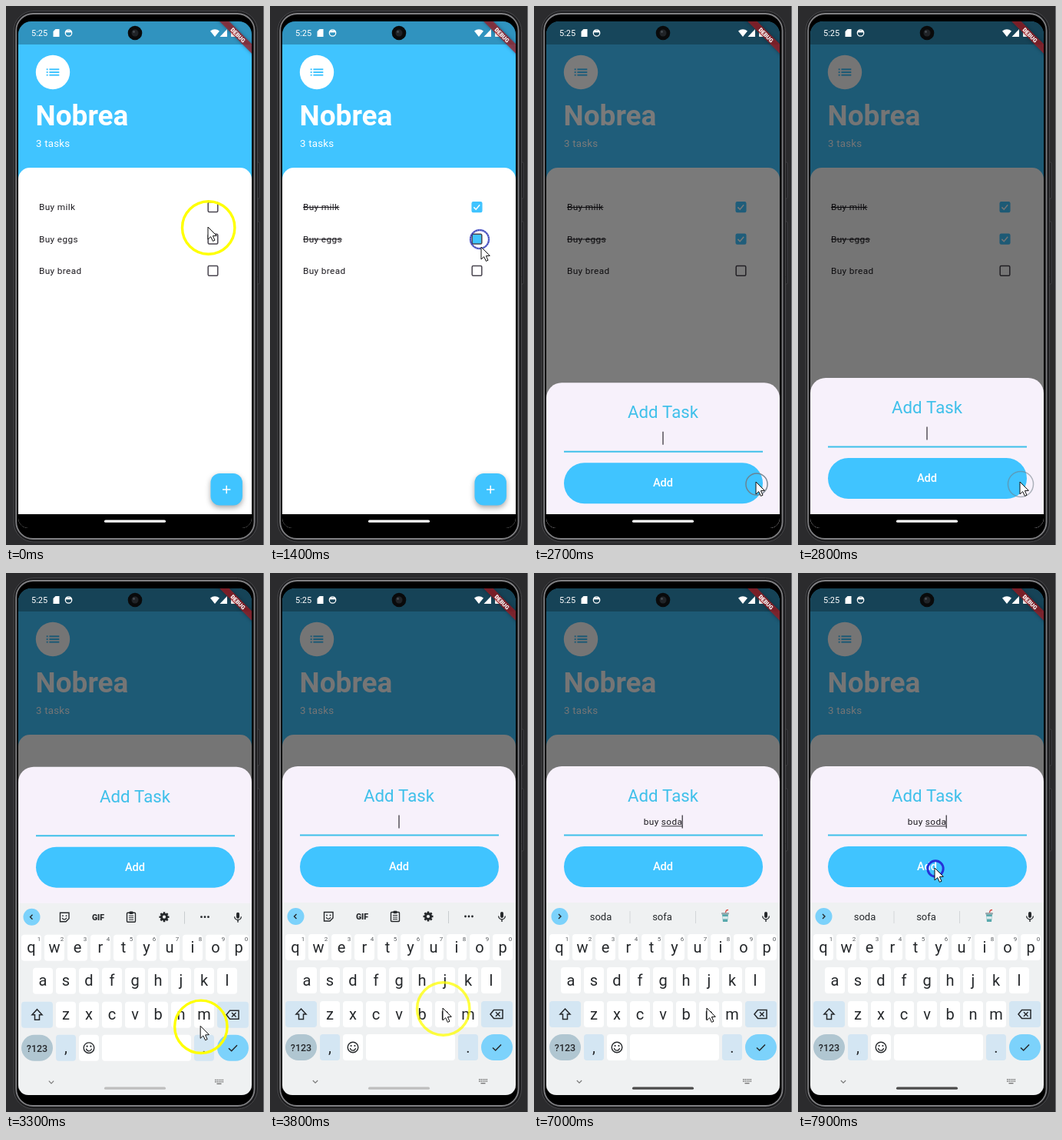
Write an HTML page with a canvas that moves like this. It is 336x700 px and loops after 8 s.

```html
<!DOCTYPE html>
<html lang="en">
<head>
<meta charset="utf-8">
<title>To-do app</title>
<style>
  html, body { margin: 0; width: 100%; height: 100%; overflow: hidden; background: #2b2b2d; }
  canvas { display: block; width: 336px; height: 700px; }
</style>
</head>
<body>
<canvas id="stage" width="336" height="700"></canvas>
<script>
const ctx = document.getElementById('stage').getContext('2d');
const LOOP = 8000;
const BLUE = '#40c4ff';
const TEAL = '#3fc0ea';
const INK = '#1d1b20';
const KEY_INK = '#25282b';

const clamp = v => Math.max(0, Math.min(1, v));
const ramp = (t, from, to) => clamp((t - from) / (to - from));
const easeOut = p => 1 - (1 - p) ** 3;
const easeInOut = p => p * p * (3 - 2 * p);

// Pointer stops: time, x, y
const path = [
  [0, 263, 287], [150, 263, 287], [550, 272, 263], [880, 272, 262], [1000, 273, 303],
  [1280, 273, 303], [1400, 275, 313], [1520, 275, 314], [2050, 283, 604],
  [2150, 283, 604], [2400, 289, 618], [2950, 289, 618], [3600, 225, 565],
  [7230, 225, 565], [7700, 178, 383], [LOOP, 178, 383]
];
const clicks = [[650, 272, 262], [1250, 273, 303], [2500, 290, 621], [7820, 179, 384]];
const CLICK_LENGTH = 400;

const tasks = [['Buy milk', 261, 720], ['Buy eggs', 302.5, 1260], ['Buy bread', 343.8, Infinity]];

// Typed text: time, content
const typed = [
  [2600, ''], [4100, 'b'], [4300, 'bu'], [4600, 'buy'], [5500, 'buy '],
  [6000, 'buy s'], [6250, 'buy so'], [6550, 'buy sod'], [6850, 'buy soda']
];
const hints = [
  [4150, ['but', 'be', 'by']], [4350, ['but', 'buy', 'bus']], [4650, ['buy', 'but', 'by']],
  [5750, ['me', 'a', 'it']], [6050, ['some', 'so', 'stuff']], [6300, ['some', 'so', 'something']],
  [6600, ['soda', 'sod', 'side']], [6900, ['soda', 'sofa', 'cup']]
];
const latest = (list, t) => list.filter(item => item[0] <= t).pop();

function box(x, y, w, h, r, fill) {
  ctx.beginPath();
  ctx.roundRect(x, y, w, h, r);
  if (fill) { ctx.fillStyle = fill; ctx.fill(); }
}
function disc(x, y, r, fill) {
  ctx.beginPath();
  ctx.arc(x, y, r, 0, Math.PI * 2);
  if (fill) { ctx.fillStyle = fill; ctx.fill(); }
}
function stroke(color, width) {
  ctx.strokeStyle = color;
  ctx.lineWidth = width;
  ctx.stroke();
}
function trace(points, closed) {
  ctx.beginPath();
  points.forEach(([x, y]) => ctx.lineTo(x, y));
  if (closed) ctx.closePath();
}
function line(points, color, width) {
  trace(points);
  stroke(color, width);
}
function shape(points, fill) {
  trace(points, true);
  ctx.fillStyle = fill;
  ctx.fill();
}
function label(str, x, y, size, color, { weight = 400, align = 'left', spacing = 0 } = {}) {
  ctx.font = `${weight} ${size}px Roboto, sans-serif`;
  ctx.letterSpacing = spacing + 'px';
  ctx.textAlign = align;
  ctx.fillStyle = color;
  ctx.fillText(str, x, y);
  return ctx.measureText(str).width;
}
const centered = { align: 'center' };

function drawPhone() {
  ctx.fillStyle = '#2b2b2d';
  ctx.fillRect(0, 0, 336, 700);
  ctx.fillStyle = '#77777a';
  ctx.fillRect(335, 0, 1, 700);
  box(325, 203, 5, 47, 1.5, '#1d1d1f'); stroke('#4b4b4e', 0.8);
  box(325, 280, 5, 81, 1.5, '#1d1d1f'); stroke('#4b4b4e', 0.8);
  box(10, 6.5, 317.5, 689.5, 26, '#1c1c1e'); stroke('#48484b', 1);
  box(13.2, 10, 310.3, 682, 22, '#000'); stroke('#808083', 1.8);
}

function drawCheckbox(y, age) {
  const filled = age >= 0;
  box(263.2, y - 6.2, 12.6, 12.6, 1.5, filled ? BLUE : null);
  stroke(filled && age > 180 ? BLUE : '#49454f', 1.5);
  const p = ramp(age, 160, 260);
  if (p > 0) {
    const tip = [268.2 + 5 * p, y + 3.2 - 6 * p];
    line([[265.4, y + 0.4], [268.2, y + 3.2], tip], '#fff', 1.5);
  }
}

function drawList(t) {
  ctx.fillStyle = BLUE;
  ctx.fillRect(16, 18, 304, 240);
  ctx.fillStyle = 'rgba(0,0,0,.25)';
  ctx.fillRect(16, 18, 304, 32);
  disc(61, 86, 22.2, '#fff');
  ctx.fillStyle = BLUE;
  for (const y of [81.3, 85, 88.7]) {
    ctx.fillRect(52.7, y, 1.9, 2);
    ctx.fillRect(56.4, y, 12.9, 2);
  }
  label('Nobrea', 38.5, 155, 37, '#fff', { weight: 700 });
  label('3 tasks', 39, 183, 13.3, '#fff', { spacing: 0.2 });
  box(16, 210, 304, 470, [15, 15, 0, 0], '#fff');

  for (const [name, y, doneAt] of tasks) {
    const width = label(name, 43, y + 4.2, 11.8, INK, { spacing: 0.37 });
    if (t >= doneAt) line([[43, y + 0.5], [43 + width, y + 0.5]], INK, 1);
    drawCheckbox(y, t - doneAt);
  }

  ctx.save();
  ctx.shadowColor = 'rgba(0,0,0,.35)';
  ctx.shadowBlur = 7;
  ctx.shadowOffsetY = 3;
  box(266.5, 607, 41.4, 41.4, 12, BLUE);
  ctx.restore();
  line([[282, 628], [292.4, 628]], '#fff', 1.5);
  line([[287.2, 622.8], [287.2, 633.2]], '#fff', 1.5);
}

function drawSheet(t, top) {
  box(16, top, 304, 200, [20, 20, 0, 0], '#f7f1fb');
  label('Add Task', 168, top + 46, 22.2, TEAL, centered);
  const [editedAt, text] = latest(typed, t) || typed[0];
  const y = top + 75.8;
  ctx.font = '400 11.8px Roboto, sans-serif';
  ctx.letterSpacing = '0.37px';
  const width = ctx.measureText(text).width;
  const start = 168 - width / 2;
  label(text, start, y, 11.8, INK, { spacing: 0.37 });
  const composing = text.slice(text.lastIndexOf(' ') + 1);
  const end = start + width;
  if (composing) {
    const w = ctx.measureText(composing).width;
    line([[end - w, y + 2], [end, y + 2]], INK, 0.9);
  }
  if (Math.floor((t - editedAt) / 500) % 2 === 0) {
    line([[end, top + 63.5], [end, top + 80.5]], '#4a474e', 1.4);
  }
  line([[39, top + 89.5], [298, top + 89.5]], TEAL, 2);
  box(39, top + 104, 259, 53, 26.5, BLUE);
  label('Add', 168, top + 135, 14.6, '#fff', { weight: 500, align: 'center' });
}

function drawMic(x, y) {
  box(x - 2, y - 6, 4, 8, 2, KEY_INK);
  ctx.beginPath();
  ctx.arc(x, y - 0.5, 4.3, 0, Math.PI);
  stroke(KEY_INK, 1.3);
  line([[x, y + 4], [x, y + 7]], KEY_INK, 1.4);
}

function drawTools() {
  line([[34.5, 443], [31.5, 446], [34.5, 449]], KEY_INK, 1.4);
  trace([[70.5, 440.5], [82, 440.5], [82, 448], [78, 452], [70.5, 452]], true);
  stroke(KEY_INK, 1.4);
  disc(74, 444.5, 0.9, KEY_INK);
  disc(78.5, 444.5, 0.9, KEY_INK);
  ctx.beginPath();
  ctx.arc(76, 446.5, 2.8, 0.2, 2.9);
  stroke(KEY_INK, 1.2);
  label('GIF', 120, 450, 10.5, KEY_INK, { weight: 900, align: 'center' });
  box(157.5, 440.5, 11, 12, 1, null); stroke(KEY_INK, 1.4);
  box(160.5, 438.8, 5, 3.5, 1, KEY_INK);
  for (const y of [444.5, 447, 449.5]) line([[160, y], [166, y]], KEY_INK, 1);
  for (let i = 0; i < 8; i++) {
    const a = i * Math.PI / 4;
    line([[206, 446], [206 + 6.5 * Math.cos(a), 446 + 6.5 * Math.sin(a)]], KEY_INK, 2.6);
  }
  disc(206, 446, 5, KEY_INK);
  disc(206, 446, 2.1, '#eff1f2');
  line([[232.5, 439], [232.5, 455]], '#c8cccf', 1);
  for (const x of [254.5, 259, 263.5]) disc(x, 446, 1.4, KEY_INK);
}

function drawCup(x, y) {
  line([[x, y - 4], [x + 1.5, y - 8], [x + 4, y - 8.5]], '#d9473f', 1.3);
  shape([[x - 4, y - 3], [x + 4, y - 3], [x + 3, y + 7], [x - 3, y + 7]], '#58a9ad');
  shape([[x - 3.6, y], [x + 3.6, y], [x + 3.2, y + 3.5], [x - 3.2, y + 3.5]], '#d8e8ea');
  box(x - 5, y - 5, 10, 2.4, 1, '#9aa9ae');
}

function drawHints(words) {
  line([[32, 443], [35, 446], [32, 449]], KEY_INK, 1.4);
  [87, 167, 248].forEach((x, i) => {
    if (words[i] === 'cup') drawCup(x + 1, 446);
    else label(words[i], x, 451, 13, KEY_INK, centered);
  });
  for (const x of [125, 210.5]) line([[x, 439], [x, 455]], '#d3d6d9', 1);
}

function drawKey(x, y, char, fill = '#fff') {
  box(x - 13, y - 17, 26, 34, 4, fill);
  label(char, x, y + 6.5, 20, KEY_INK, centered);
}

function drawKeyboard(t) {
  const tint = '#d4e6f3';
  ctx.fillStyle = '#eff1f2';
  ctx.fillRect(16, 428, 304, 252);
  disc(33.5, 446, 11, '#7cd2fb');
  const words = latest(hints, t);
  if (words) drawHints(words[1]); else drawTools();
  drawMic(302, 446);

  [...'qwertyuiop'].forEach((c, i) => {
    drawKey(33 + 30 * i, 486, c);
    label((i + 1) % 10, 43 + 30 * i, 477.5, 8, '#55595d', centered);
  });
  [...'asdfghjkl'].forEach((c, i) => drawKey(48 + 30 * i, 529, c));
  [...'zxcvbnm'].forEach((c, i) => drawKey(78 + 30 * i, 573, c));

  box(20, 556, 41, 34, 4, tint);
  trace([[40.5, 566], [47, 573], [43.5, 573], [43.5, 579.5], [37.5, 579.5], [37.5, 573], [34, 573]], true);
  stroke(KEY_INK, 1.5);
  box(275, 556, 41, 34, 4, tint);
  trace([[287, 573], [291.5, 567.5], [303, 567.5], [303, 578.5], [291.5, 578.5]], true);
  stroke(KEY_INK, 1.5);
  line([[294, 570.2], [299.6, 575.8]], KEY_INK, 1.4);
  line([[299.6, 570.2], [294, 575.8]], KEY_INK, 1.4);

  box(20, 599, 41, 34, 17, '#b0c6d1');
  label('?123', 40.5, 621, 12.5, KEY_INK, { weight: 500, align: 'center' });
  drawKey(78, 616, ',', tint);
  box(95, 599, 26, 34, 4, '#fff');
  disc(108, 616, 6.8); stroke(KEY_INK, 1.4);
  disc(105.6, 614, 1.1, KEY_INK);
  disc(110.4, 614, 1.1, KEY_INK);
  ctx.beginPath();
  ctx.arc(108, 616.5, 3.6, 0.15, 3);
  stroke(KEY_INK, 1.3);
  box(125, 599, 116, 34, 4, '#fff');
  drawKey(258, 616, '.', tint);
  box(275, 599, 41, 34, 17, '#7cd2fb');
  line([[290, 616.5], [293.7, 620], [301, 612.5]], KEY_INK, 1.5);

  line([[55.8, 659], [59, 662.2], [62.2, 659]], '#777', 1.1);
  ctx.fillStyle = '#777';
  for (let i = 0; i < 10; i++) ctx.fillRect(272 + (i % 5) * 2.4, 657 + Math.floor(i / 5) * 2.4, 1.5, 1.5);
  ctx.fillRect(274.5, 662, 6, 1.4);
}

function drawBanner() {
  ctx.save();
  ctx.translate(320, 20);
  ctx.rotate(Math.PI / 4);
  ctx.shadowColor = 'rgba(0,0,0,.5)';
  ctx.shadowBlur = 4;
  ctx.fillStyle = 'rgba(172,24,30,.68)';
  ctx.fillRect(-40, 20.7, 80, 8.9);
  ctx.shadowColor = 'transparent';
  label('DEBUG', 0, 27.9, 7.4, '#fff', { weight: 900, align: 'center' });
  ctx.restore();
}

function drawStatus() {
  label('5:25', 33, 39, 11, '#fff');
  shape([[64.5, 30], [69.5, 30], [69.5, 40], [61.5, 40], [61.5, 33]], '#fff');
  disc(81.5, 35, 4.2); stroke('#fff', 1.3);
  ctx.fillStyle = '#fff';
  ctx.fillRect(78, 32, 7, 2.4);
  disc(168, 35, 9.3, '#090a0b');
  disc(168, 35, 4.5, '#202327');
  disc(166.5, 33.5, 1.4, '#464b51');

  ctx.beginPath();
  ctx.moveTo(272, 40);
  ctx.lineTo(266, 32.5);
  ctx.quadraticCurveTo(272, 27.8, 278, 32.5);
  ctx.fillStyle = '#fff';
  ctx.fill();
  shape([[288, 30], [288, 40], [278.5, 40]], '#fff');
  box(293, 31, 6, 9, 1, '#fff');
  ctx.fillRect(294.7, 29.8, 2.6, 1.5);
  drawBanner();
}

function drawScreen(t) {
  const open = easeOut(ramp(t, 2540, 2780));
  const lift = easeOut(ramp(t, 3000, 3350));
  ctx.save();
  box(16, 20, 304, 658, [17, 17, 13, 13]);
  ctx.clip();
  drawList(t);
  if (open > 0) {
    ctx.fillStyle = `rgba(0,0,0,${0.54 * open})`;
    ctx.fillRect(16, 18, 304, 662);
    drawSheet(t, 660 - 177 * open - 232 * lift);
  }
  ctx.fillStyle = '#000';
  ctx.fillRect(16, 660, 304, 20);
  if (lift > 0) {
    ctx.save();
    ctx.translate(0, 250 * (1 - lift));
    drawKeyboard(t);
    ctx.restore();
  }
  drawStatus();
  const shade = t < 3150 ? 255 : 190 - 115 * ramp(t, 3850, 4200);
  box(128, 667.6, 80, 3.2, 1.6, `rgb(${shade},${shade},${shade})`);
  ctx.restore();
}

function pointerAt(t) {
  const i = Math.max(1, path.findIndex(stop => stop[0] > t));
  const [t0, x0, y0] = path[i - 1];
  const [t1, x1, y1] = path[i];
  const p = easeInOut(ramp(t, t0, t1));
  return [x0 + (x1 - x0) * p, y0 + (y1 - y0) * p];
}

function drawClick(age, x, y) {
  if (age < 200) {
    const release = ramp(age, 80, 150);
    disc(x, y, 8 + 4 * ramp(age, 0, 150));
    stroke(`rgba(38,50,216,${1 - 0.3 * release})`, 3 - 0.6 * release);
    if (release > 0) {
      ctx.setLineDash([1.5, 1.5]);
      stroke(`rgba(32,36,44,${0.45 * release})`, 1.6);
      ctx.setLineDash([]);
    }
  } else {
    const p = ramp(age, 200, CLICK_LENGTH);
    disc(x, y, 14 + 5 * p);
    stroke(`rgba(110,125,135,${0.9 - 0.7 * p})`, 1.5);
  }
}

function drawPointer(t) {
  const [x, y] = pointerAt(t);
  const click = clicks.find(([at]) => t >= at && t < at + CLICK_LENGTH);
  if (click) {
    drawClick(t - click[0], click[1], click[2]);
  } else {
    const glow = t < 7000 ? 1 - ramp(t, 3720, 4050) : ramp(t, 7200, 7300);
    if (glow > 0) {
      disc(x + 0.7, y + 1, 34.2);
      stroke(`rgba(255,255,0,${glow})`, 3.4);
    }
  }
  trace([[0, 0], [0, 16], [3.7, 12.6], [6.4, 18.4], [9, 17.2], [6.4, 11.6], [11.3, 11.3]]
    .map(([dx, dy]) => [x + dx, y + dy]), true);
  ctx.fillStyle = '#fff';
  ctx.fill();
  stroke('#111', 1);
}

function frame(now) {
  const t = now % LOOP;
  drawPhone();
  drawScreen(t);
  drawPointer(t);
  requestAnimationFrame(frame);
}
requestAnimationFrame(frame);
</script>
</body>
</html>
```
